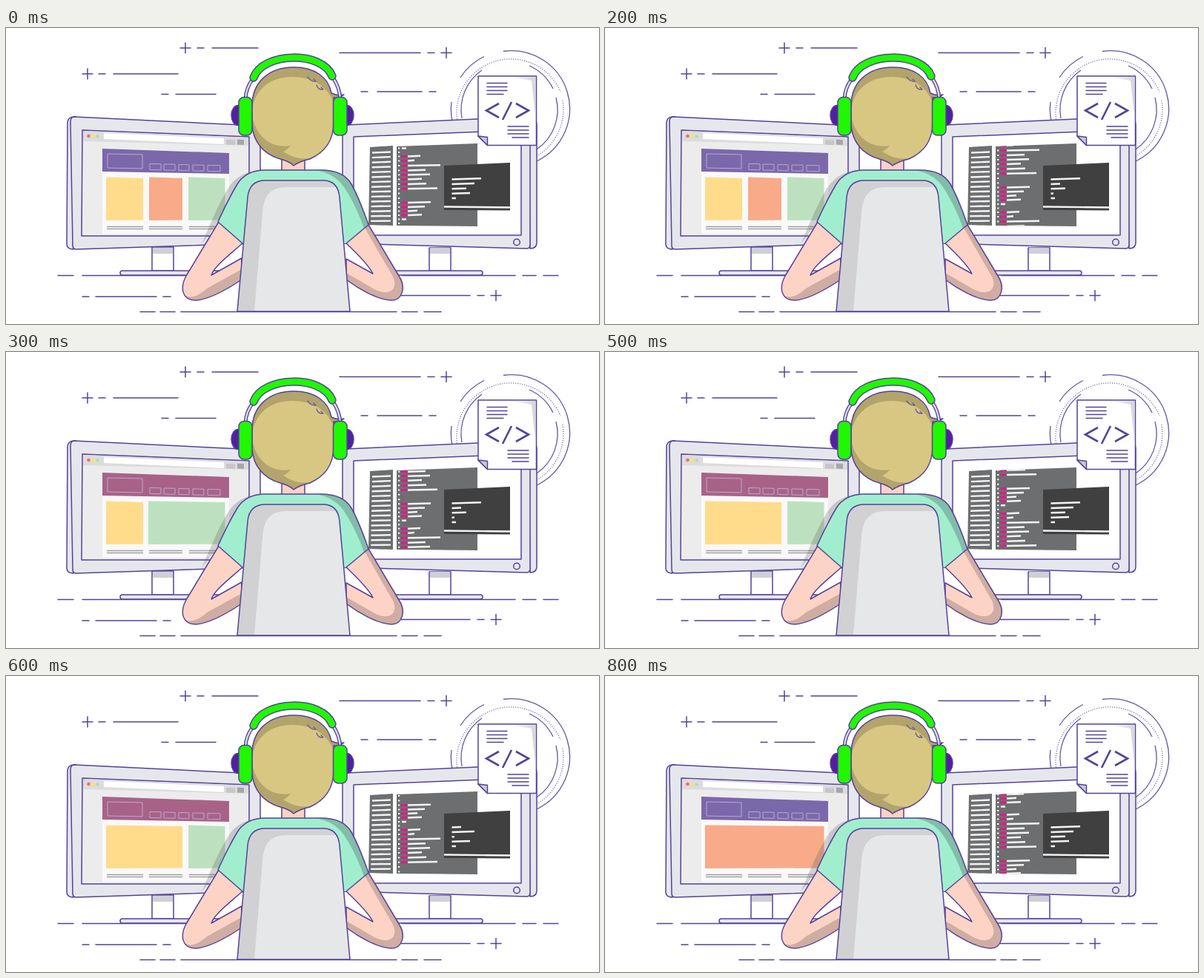
These frames come from a looping animation (800 px wide and 400 px high, 900 ms). An HTML page:

```html
<!DOCTYPE html>
<html lang="en">
<head>
<meta charset="utf-8">
<title>Developer at work</title>
<style>
  html, body { margin: 0; width: 100%; height: 100%; overflow: hidden; background: #fff; }
  svg { display: block; width: 100%; height: 100%; }
  .o { stroke: #55429b; stroke-width: 1.5; stroke-linejoin: round; stroke-linecap: round; }
  .n { fill: none; }
  .thin { stroke: #6655a5; stroke-width: 1.3; }
  .body { fill: #e6e7ec; }
  .skin { fill: #fcd3c5; }
  .skinShade { fill: #cfada2; }
  .green { fill: #21f800; }
  .editor { fill: #6d6e70; }
  .w { stroke: #f4f4f4; fill: none; }
</style>
</head>
<body>
<svg viewBox="0 0 800 400">
  <defs>
    <clipPath id="editorClip"><path d="M527 160L636 156V268L527 267Z"/></clipPath>
    <linearGradient id="paperShade" x1="0" x2="1"><stop stop-color="#fff"/><stop offset="1" stop-color="#d4d4d8"/></linearGradient>
  </defs>

  <!-- floating dashes and ground -->
  <path class="o n" d="M103 62h14m-7-7v14M125 62h9M145 62h87M235 27h14m-7-7v14M258 27h9M278 27h62
    M210 89.500h9M229 89.500h54M450 33.500h109M569 33.500h9M587 33.500h14m-7-7v14M479 86h9M501 86h60M571 86h9
    M70 334.500h21M103 334.500h140M535 334.500h152M697 334.500h18M725 334.500h20
    M103 363h9M121 363h82M212 363h10M533 361.500h93M636 361.500h9M654 361.500h14m-7-7v14
    M181 383.500h20M208 383.500h20M236 383.500h291M534 383.500h21M564 383.500h23"/>

  <!-- rings behind the document -->
  <g fill="none">
    <path class="thin" d="M671 31.500A78.500 78.500 0 0 1 716 180M613 67A78.500 78.500 0 0 1 645 38.500M602 126A78.500 78.500 0 0 1 601 100"/>
    <path class="thin" d="M610 132A73 73 0 0 1 748 86M751 98A73 73 0 0 1 716 173" stroke-dasharray="1 2"/>
    <path class="thin" d="M615 122A65 65 0 0 1 642 57M706 51A65 65 0 0 1 738 82M742 94A65 65 0 0 1 716 164"/>
  </g>

  <!-- left monitor -->
  <path class="o body" d="M94 120Q83 119 83 129L82 290Q81 299 91 299Z"/>
  <path class="o body" d="M92 120L338 132Q343 133 343 139V291L95 299Q90 299 90 294L87 127Q87 120 92 120Z"/>
  <path class="o" fill="#fff" d="M197 296H226V328H197Z"/>
  <path fill="#cfd0d6" d="M198 297H225V305H198Z"/>
  <rect class="o body" x="154" y="328" width="150" height="6" rx="3"/>
  <path class="o" fill="#ececed" d="M103 138L328 147V281H102Z"/>
  <path fill="#dcdcde" d="M104 139L327 148V159L104 153Z"/>
  <path fill="#fff" d="M132 142L294 149V157L132 150Z"/>
  <path fill="#c6c6c8" d="M297 151L309 151.500V158L297 157.500Z"/>
  <path fill="#a7a7a9" d="M312 150.500L321 151V158L312 157.500Z"/>
  <circle cx="111.500" cy="146" r="2.300" fill="#ee6d66"/>
  <circle cx="117.500" cy="146" r="2.300" fill="#fbe94e"/>
  <circle cx="123.500" cy="146.500" r="2.300" fill="#b9dcaa"/>
  <path fill="#f9f9f9" d="M130 190H301V278H130Z"/>
  <path id="banner" d="M130 163L301 169V197L130 194Z"/>
  <path fill="none" stroke="#b9a9d2" d="M137 170L184 171V190L137 189Z
    M194 183.500l15 .3v8l-15-.3zM213 184l15 .3v8l-15-.3zM233 184.500l14 .3v8l-14-.3zM252 185l15 .3v8l-15-.3zM272 185.500l17 .3v8l-17-.3z"/>
  <g id="cards"></g>
  <path stroke="#a0a0a0" stroke-width="1.500" d="M136 268.500h49M193 268.500h45M247 268.500h48M136 271.500h49M193 271.500h45M247 271.500h48"/>

  <!-- right monitor -->
  <path class="o body" d="M705 121Q716 121 716 131V290Q716 298 707 298Z"/>
  <path class="o body" d="M459 131L702 120Q707 120 707 126V293Q707 298 702 298L454 291V137Q454 132 459 131Z"/>
  <path class="o" fill="#fff" d="M571 297H600V328H571Z"/>
  <path fill="#cfd0d6" d="M572 297H599V305H572Z"/>
  <rect class="o body" x="494" y="328" width="149" height="6" rx="3"/>
  <path class="o" fill="#fff" d="M469 147L695 138V280H469Z"/>
  <circle class="o body" cx="689" cy="289.500" r="4.300"/>
  <path class="editor" d="M491 161L522 159V267L489 266Z"/>
  <path id="sidebar" class="w" stroke-width="2.400"/>
  <path class="editor" d="M527 160L636 156V268L527 267Z"/>
  <g clip-path="url(#editorClip)"><g id="code"></g></g>
  <path fill="#404041" d="M591 186L680 182V246.500L591 246Z"/>
  <path class="w" stroke-width="2.400" d="M591 241.500L680 242.500"/>
  <path id="console" class="w" stroke-width="2.500"/>

  <!-- document -->
  <path class="o" fill="#fff" d="M637 65H715.500V158.500H649.500L637 146Z"/>
  <path fill="url(#paperShade)" d="M678 66H714.500V122L709 71Z"/>
  <path class="o" fill="#c9c9d0" d="M637 146L649.500 158.500V147.500Z"/>
  <path class="o n" d="M649 74.500h27M649 79.500h27M649 84.500h27M649 89.500h22M677 133h28M677 138h28M677 143h28M683 148h22"/>
  <path class="n" stroke="#55429b" stroke-width="2.600" d="M665 102L648 111.500L665 121M682 100L670 124M688 102L705 111.500L688 121"/>

  <!-- person -->
  <path fill="#555" opacity=".25" d="M342 192Q315 195 302 213C288 234 276 264 264 292L287 262L320 200Z"/>
  <path class="skin" d="M287 262L243 335C234 352 238 368 256 368C275 367 300 352 318 340V311L277 334C281 322 300 308 320 290Z"/>
  <path class="skinShade" d="M240 361C250 367 261 361 271 352L318 326V340C300 352 275 367 256 368Q244 368 240 361Z"/>
  <path class="o n" d="M287 262L243 335C234 352 238 368 256 368C275 367 300 352 318 340V311L277 334C281 322 300 308 320 290"/>
  <path class="skin" d="M489 266L530 335C540 350 535 368 520 368C500 367 475 352 459 340V312L495 332C489 320 476 307 459 291Z"/>
  <path class="skinShade" d="M489 266L530 335C540 350 535 368 520 368C500 367 475 352 459 340V331L497 353C516 363 530 354 522 336L484 270Z"/>
  <path class="o n" d="M489 266L530 335C540 350 535 368 520 368C500 367 475 352 459 340V312L495 332C489 320 476 307 459 291"/>
  <path class="o skin" d="M372 172H403V194H372Z"/>
  <path fill="#a1eecf" d="M286 262C295 242 303 226 312 211Q323 193 348 192H425Q455 192 466 211C475 227 482 246 489 266L459 291H319Z"/>
  <path fill="#83bda9" d="M418 192H425Q455 192 466 211C475 227 482 246 489 266L483 271C476 250 467 232 456 215Q444 197 418 192Z"/>
  <path class="o n" d="M319 291L286 262C295 242 303 226 312 211Q323 193 348 192H425Q455 192 466 211C475 227 482 246 489 266L459 291"/>
  <path fill="#d1d1d3" d="M312 383L326 229Q328 206 350 206H428Q448 206 450 229L464 383Z"/>
  <path fill="#e6e7e9" d="M335 383L346 250C348 225 357 215 380 215H447Q450 221 450 229L464 383Z"/>
  <path class="o n" d="M312 383L326 229Q328 206 350 206H428Q448 206 450 229L464 383Z"/>

  <ellipse class="o" cx="313" cy="118" rx="9" ry="13.500" fill="#521f9f"/>
  <ellipse class="o" cx="460" cy="118" rx="9" ry="13.500" fill="#521f9f"/>
  <path class="o" fill="#b3a46c" d="M332 105C332 74 354 53 388 53C416 53 435 66 439 88Q447 92 456 90Q450 95 442 94V130C441 155 428 169 410 177Q396 180 388 186Q382 180 370 177C348 171 333 154 332 130Z"/>
  <path fill="#d8c782" d="M333 106C338 80 360 66 386 66C413 66 432 78 441 98V130C440 155 428 168 409 176Q392 179 374 167Q379 165 384 159C360 163 340 150 333 123Z"/>
  <path class="o n thin" d="M407 66Q411 73 418 72M415 69L418 72M419 77Q421 84 428 83M425 80L428 83"/>
  <g fill="none" stroke-linecap="round">
    <path d="M333 69Q324 80 323 96M441 67Q450 80 451 96" stroke="#55429b" stroke-width="5"/>
    <path d="M333 69Q324 80 323 96M441 67Q450 80 451 96" stroke="#dcdce2" stroke-width="2.300"/>
    <path d="M334 67C347 32 427 31 440 65" stroke="#55429b" stroke-width="11.500"/>
    <path d="M334 67C347 32 427 31 440 65" stroke="#21f800" stroke-width="8.500"/>
  </g>
  <rect class="o green" x="314" y="93.500" width="18" height="51.500" rx="7"/>
  <rect class="o green" x="441.500" y="93.500" width="18.500" height="51.500" rx="7"/>
</svg>
<script>
const $ = id => document.getElementById(id);
const STEP = 100, STEPS = 9;

const YELLOW = '#fedc8b', ORANGE = '#f8aa89', GREEN = '#bde1bf';
const PURPLE = '#7a68ab', MAGENTA = '#a96287';
// Each page: first step, banner colour, cards as [left, right, colour].
const pages = [
  [0, PURPLE, [[135, 185, YELLOW], [193, 238, ORANGE], [246, 295.5, GREEN]]],
  [3, MAGENTA, [[135, 185, YELLOW], [192, 295.5, GREEN]]],
  [5, MAGENTA, [[135, 238, YELLOW], [246, 295.5, GREEN]]],
  [7, PURPLE, [[135, 295.5, ORANGE]]]
];
// The second page already shows on the fourth tenth of a second.
pages[1][0] = 3;

// Right ends of the console lines, one set for every two steps.
const full = [641, 632, 621, 626, 607];
const consoleSets = [full, [641, 614, 621, 605, 607], full, [614, 632, 605, 626, 607], full];

// Code lines as [offset, right end]; 0 is an empty line.
const lines = [[0, 573], [6, 565], [11.5, 555], [17, 561], [22.5, 540], [28, 0], [33.5, 559], [39.5, 551],
  [46, 586], [52.5, 566], [58.5, 572], [64.5, 561], [71, 567], [77.3, 582], [83.5, 0], [90, 0]];
const CODE_HEIGHT = 96, SCROLL = 10.25;

const stroke = (d, color, width) => `<path d="${d}" stroke="${color}" stroke-width="${width}"/>`;

function codeBlock() {
  let dots = '', pink = '', white = '';
  for (let block = -1; block <= 2; block++) {
    for (const [offset, end] of lines) {
      const y = offset + block * CODE_HEIGHT;
      dots += `M529 ${y}h2.300`;
      if (end === 540) white += `M534 ${y}H540`;
      else if (end) {
        pink += `M533 ${y}h8.500`;
        white += `M542 ${y}L${end} ${y - .7}`;
      }
    }
  }
  return stroke(dots, '#f4f4f4', 2) + stroke(pink, '#e4178c', 2.8) + stroke(white, '#f4f4f4', 2.5);
}

$('code').innerHTML = codeBlock();
$('sidebar').setAttribute('d', Array.from({ length: 15 }, (_, i) =>
  `M${494 - i * .13} ${168.5 + i * 6.6}L519 ${167.5 + i * 6.65}`).join(''));

let shown = -1;
function draw() {
  const step = Math.floor(performance.now() / STEP) % STEPS;
  if (step !== shown) {
    shown = step;
    const [, banner, cards] = pages.filter(page => page[0] <= step).pop();
    $('banner').setAttribute('fill', banner);
    $('cards').innerHTML = cards.map(([left, right, color]) =>
      `<path fill="${color}" d="M${left} 201.500L${right} 203V259.500L${left} 260Z"/>`).join('');
    $('code').setAttribute('transform', `translate(0 ${236 - SCROLL * step})`);
    $('console').setAttribute('d', consoleSets[step >> 1].map((end, i) =>
      `M601.500 ${204.5 + i * 6.4}L${end} ${204.5 + i * 6.4 - (end - 601) * .03}`).join(''));
  }
  requestAnimationFrame(draw);
}
draw();
</script>
</body>
</html>
```
